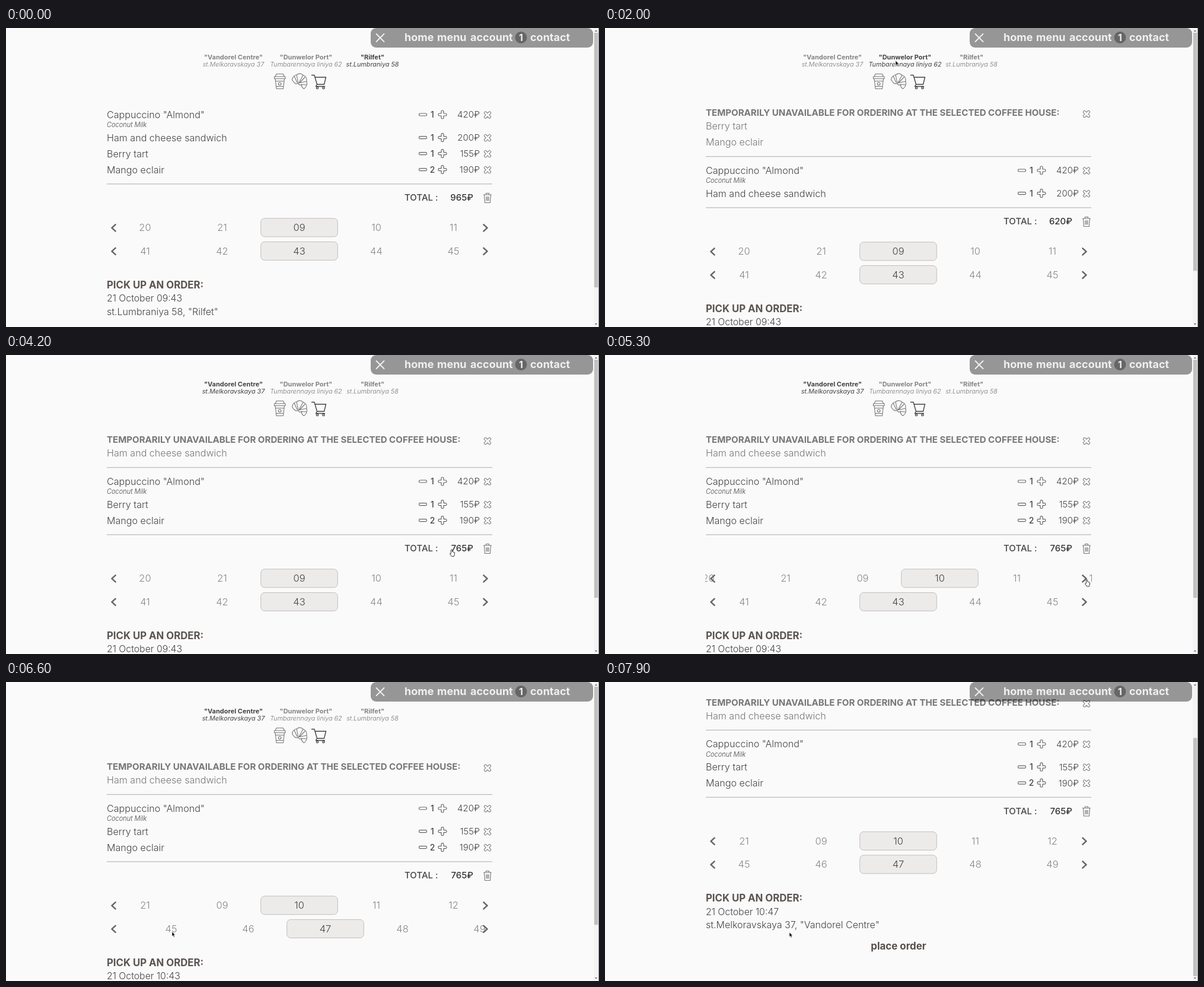
An HTML page that plays this animation: 1000 px wide and 504 px high, repeating every 8000 ms.

```html
<!DOCTYPE html>
<html lang="en">
<head>
<meta charset="utf-8">
<title>Coffee order</title>
<style>
  html, body { margin: 0; width: 100%; height: 100%; overflow: hidden; background: #fafafa; }
  svg { display: block; width: 1000px; height: 504px; font-family: Inter, "Open Sans", sans-serif; }
</style>
</head>
<body>
<svg id="stage" viewBox="0 0 1000 504"></svg>
<script>
const LOOP = 8000, STEP = 100;
const stage = document.getElementById('stage');

const houses = [
  { name: '"Vandorel Centre"', street: 'st.Melkoravskaya 37', x: 383.5, missing: ['ham'] },
  { name: '"Dunwelor Port"', street: 'Tumbarennaya liniya 62', x: 506, missing: ['berry', 'mango'] },
  { name: '"Rilfet"', street: 'st.Lumbraniya 58', x: 618, missing: [] },
];
const goods = [
  { id: 'almond', name: 'Cappuccino "Almond"', note: 'Coconut Milk', count: 1, price: 420 },
  { id: 'ham', name: 'Ham and cheese sandwich', count: 1, price: 200 },
  { id: 'berry', name: 'Berry tart', count: 1, price: 155 },
  { id: 'mango', name: 'Mango eclair', count: 2, price: 190 },
];
const totals = [765, 620, 965];

// time, x, y of the pointer
const pointerPath = [
  [800, 690, 430], [1100, 560, 150], [1700, 560, 150], [1900, 490, 55],
  [2800, 490, 55], [2900, 419, 54], [3600, 419, 54], [4400, 810, 378],
  [5500, 810, 378], [5700, 756, 421], [6200, 756, 421], [6600, 280, 421],
  [7800, 280, 421], [7900, 311, 422],
];

const clamp = v => Math.min(1, Math.max(0, v));
const progress = (t, start, length) => clamp((t - start) / length);
const easeOut = (p, power = 3) => 1 - (1 - p) ** power;
const smooth = p => p * p * (3 - 2 * p);

function pointerAt(t) {
  let i = 0;
  while (i < pointerPath.length - 2 && pointerPath[i + 1][0] <= t) i++;
  const [t0, x0, y0] = pointerPath[i], [t1, x1, y1] = pointerPath[i + 1];
  const p = smooth(progress(t, t0, t1 - t0));
  return [x0 + (x1 - x0) * p, y0 + (y1 - y0) * p];
}

function minuteAt(t) {
  if (t >= 2900 && t < 3300) return 42 + easeOut(progress(t, 2900, 370));
  if (t < 6200) return 43;
  if (t <= 6600) return 43 + (756 - pointerAt(t)[0]) / 130;
  const released = 43 + 476 / 130;
  return released + (47 - released) * easeOut(progress(t, 6600, 400));
}

// y is the middle of the capital letters
const text = (x, y, string, size, weight, fill, attrs = '') =>
  `<text x="${x}" y="${y + size * .364}" font-size="${size}" font-weight="${weight}" fill="${fill}" ${attrs}>${string}</text>`;
const line = (d, color, width, attrs = '') =>
  `<path d="${d}" fill="none" stroke="${color}" stroke-width="${width}" stroke-linejoin="round" stroke-linecap="round" ${attrs}/>`;
const middle = 'text-anchor="middle"', right = 'text-anchor="end"', italic = 'font-style="italic"';

const rule = y => `<path d="M170 ${y}H820" stroke="#bdbbb9" stroke-width="1.3"/>`;
const cross = (x, y, angle, color, width) => line(
  'M-2-2V-5.5Q-2-7 0-7T2-5.5V-2H5.5Q7-2 7 0T5.5 2H2V5.5Q2 7 0 7T-2 5.5V2H-5.5Q-7 2-7 0T-5.5-2Z',
  color, width, `transform="translate(${x} ${y}) rotate(${angle})"`);
const remove = y => cross(812, y, 45, '#777', 1);

function header(selected) {
  const labels = houses.map((house, i) => {
    const on = i === selected;
    return text(house.x, 48.5, house.name, 11, 700, on ? '#444' : '#858585', middle)
      + text(house.x, 61.5, house.street, 10.8, on ? 400 : 300, on ? '#444' : '#777', `${middle} ${italic}`);
  }).join('');
  const cup = line('M454 82L456 77.5H467.5L469.5 82M452.5 82H471V85.5H452.5ZM454 85.5L456 102.5H467.5L469.5 85.5M454.5 89.5H469M455.5 98.5H468M464 94A2.3 2.3 0 1 1 459.4 94A2.3 2.3 0 1 1 464 94', '#777', 1.1);
  const croissant = line('M482.5 87Q484 80 490 79Q496 74.5 501 79.5Q508 82 507 90Q509 98 502.5 102.5Q498 100 498.5 95Q495 98 493 93.5Q487 96 482.5 87ZM490 79L493 93.5M486 81L491 92M501 79.5L494 92.5M507 90L495 92.5L504 83M498.5 95L507 96', '#777', 1.1);
  const cart = line('M515.5 79.5H520L524.5 95H536.5L539.5 83H521M524.5 95L522.5 98.5H537.5', '#444', 1.4)
    + [525, 535.5].map(x => `<circle cx="${x}" cy="101" r="1.7" fill="none" stroke="#444" stroke-width="1.3"/>`).join('');
  return labels + cup + croissant + cart;
}

function goodsRow(item, y) {
  return text(170, y, item.name, 16.1, 300, '#444')
    + (item.note ? text(170, y + 17.3, item.note, 11, 300, '#444', italic) : '')
    + `<rect x="696.5" y="${y - 2}" width="13" height="4" rx="1.8" fill="none" stroke="#666" stroke-width="1.2"/>`
    + text(719, y, item.count, 14, 500, '#444', middle)
    + cross(736, y, 0, '#666', 1.2)
    + text(799, y, item.price + '₽', 15, 300, '#444', right)
    + remove(y + .5);
}

function carousel(y, position, active, label) {
  let slides = '';
  for (let i = active - 4; i <= active + 4; i++) {
    const x = 494.5 + (i - position) * 130, on = i === active;
    if (on) slides += `<rect x="${x - 64.8}" y="${y - 15.5}" width="129.6" height="31" rx="6.5" fill="#edebea" stroke="#c2bebc"/>`;
    slides += text(x, y - .3, label(i), 16.5, 300, on ? '#444' : '#888', middle);
  }
  return `<g clip-path="url(#lane)">${slides}</g>`
    + line(`M184.5 ${y - 5}L178.5 ${y + .5}L184.5 ${y + 6}M805.5 ${y - 5}L811.5 ${y + .5}L805.5 ${y + 6}`, '#6b6664', 2.6);
}

const trash = y => line(`M805.5 ${y - 5}H818.5M809.5 ${y - 5}V${y - 7.5}H814.5V${y - 5}M806.5 ${y - 5}L807.5 ${y + 8.5}H816.5L817.5 ${y - 5}M810 ${y - 1.5}V${y + 5}M812 ${y - 1.5}V${y + 5}M814 ${y - 1.5}V${y + 5}`, '#777', 1.1);

const nav = '<rect x="615" width="375" height="33" rx="9" fill="#000" fill-opacity=".4"/>'
  + line('M624.5 10L637.5 23M637.5 10L624.5 23', '#f2f2f2', 1.8)
  + [[672, 'home'], [727, 'menu'], [783, 'account'], [884, 'contact']]
    .map(([x, word]) => text(x, 15.5, word, 18, 700, '#f0f0f0')).join('')
  + '<circle cx="868.5" cy="16" r="10" fill="#666"/>'
  + text(868.5, 16, '1', 16, 700, '#f0f0f0', middle);

function scrollbar(scroll, pageHeight) {
  const top = 8 + 488 * scroll / pageHeight, height = 488 * 504 / pageHeight;
  return '<rect x="991" width="9" height="504" fill="#f4f4f4"/>'
    + `<rect x="992" y="${top}" width="6.5" height="${height}" fill="#c1c1c1"/>`
    + '<rect x="999" width="1" height="504" fill="#999"/>'
    + '<path d="M993 6L995 3.5L997 6ZM993 498L995 500.5L997 498Z" fill="#666"/>';
}

function pointer(t) {
  if (t < 800) return '';
  const [x, y] = pointerAt(t), hand = t >= 2800 && t < 5600;
  const shape = hand
    ? '<path d="M1.5 7V1Q2.5-.5 3.5 1V4L7.5 5.5V9L6.5 12H2.5L-.5 7.5Z" fill="#fff" stroke="#222" stroke-width=".9"/>'
    : '<path d="M0 0V7.5L1.7 6L3 9L4.2 8.5L3 5.6H5.3Z" fill="#111" stroke="#fff" stroke-width=".4"/>';
  return `<g transform="translate(${x} ${y})">${shape}</g>`;
}

function draw(t) {
  const selected = t < 1800 ? 2 : t < 2900 ? 1 : 0;
  const house = houses[selected];
  const missing = goods.filter(g => house.missing.includes(g.id));
  const present = goods.filter(g => !house.missing.includes(g.id));
  let page = header(selected), y = 146;

  if (missing.length) {
    page += text(170, 142.7, 'TEMPORARILY UNAVAILABLE FOR ORDERING AT THE SELECTED COFFEE HOUSE:', 15.08, 700, '#777') + remove(145);
    y = 165.5;
    for (const item of missing) {
      page += text(170, y, item.name, 16.1, 300, '#777');
      y += 27;
    }
    page += rule(y - 2.9);
    y += 20.5;
  }
  for (const item of present) {
    page += goodsRow(item, y);
    y += item.note ? 38.7 : 27;
  }
  page += rule(y - 2.9);

  // the slide chosen with the arrow is marked as soon as it starts to move
  const total = y + 20.3;
  const hour = easeOut(progress(t, 5231, 370)), minute = minuteAt(t);
  const activeMinute = t < 6200 ? 43 : Math.round(minute);
  const clock = `${t < 5600 ? '09' : '10'}:${t < 7000 ? 43 : 47}`;
  page += text(672, total, 'TOTAL :', 15, 500, '#444')
    + text(788, total, totals[selected] + '₽', 15, 500, '#333', right)
    + trash(total)
    + carousel(total + 50.4, hour, Math.ceil(hour), i => String(9 + (i + 13) % 13).padStart(2, '0'))
    + carousel(total + 89.9, minute, activeMinute, i => i)
    + text(170, total + 146.7, 'PICK UP AN ORDER:', 16.75, 700, '#5a5350')
    + text(170, total + 169.3, '21 October ' + clock, 15.8, 300, '#444')
    + text(170, total + 192, `${house.street}, ${house.name}`, 16, 300, '#444')
    + text(495, total + 227.5, 'place order', 16.9, 700, '#554f4c', middle);

  const scroll = 108.5 * easeOut(progress(t, 7200, 400), 1.57);
  stage.innerHTML = '<clipPath id="lane"><rect x="169" y="0" width="652" height="700"/></clipPath>'
    + `<rect width="1000" height="504" fill="#fafafa"/><g transform="translate(0 ${-scroll})">${page}</g>`
    + nav + scrollbar(scroll, total + 287) + pointer(t);
}

let shown = -1;
function tick() {
  const t = Math.floor(performance.now() % LOOP / STEP) * STEP;
  if (t !== shown) draw(shown = t);
  requestAnimationFrame(tick);
}
tick();
</script>
</body>
</html>
```
